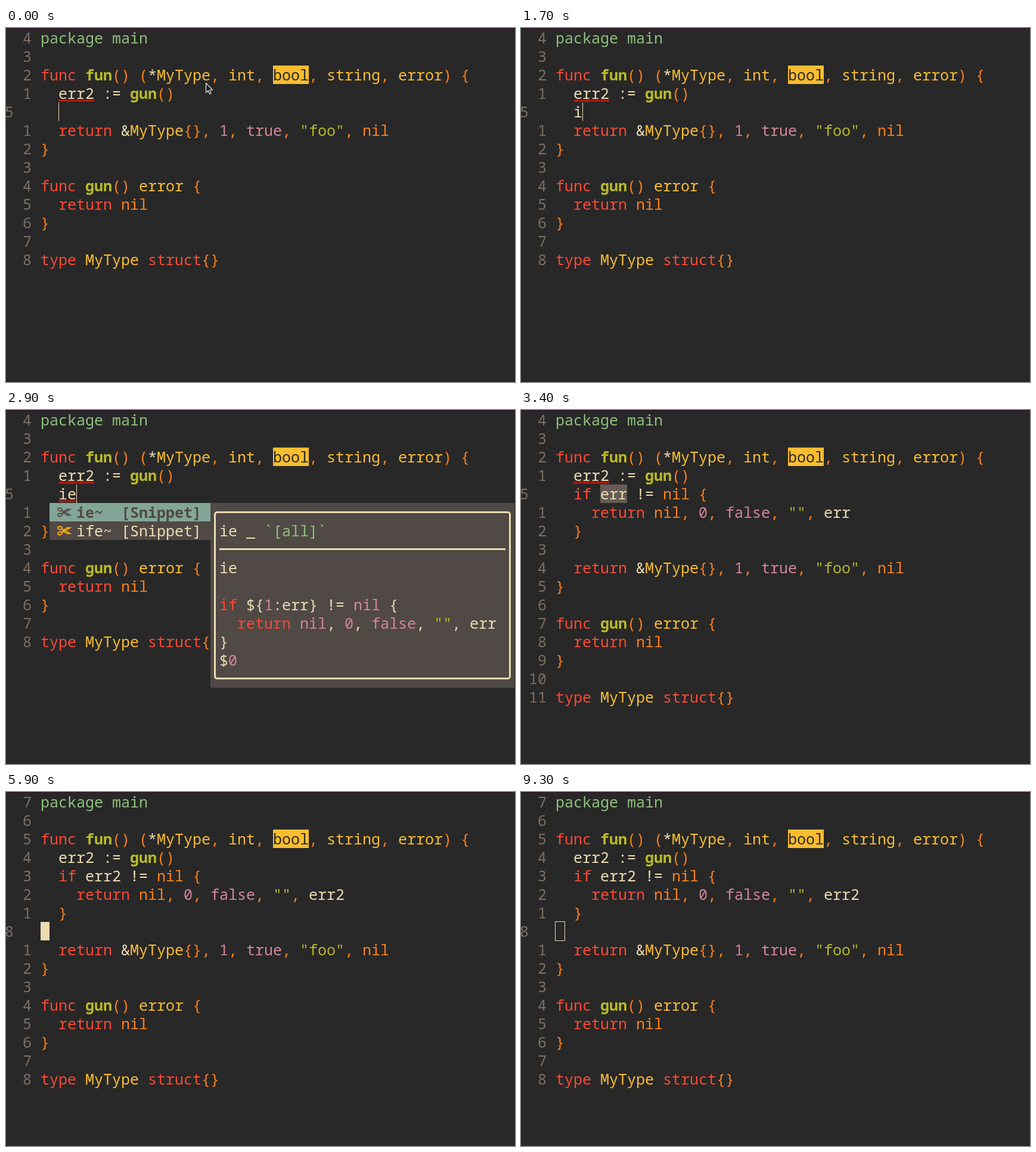
These frames come from a looping animation (854x594 px, 9400 ms). An HTML page:

```html
<!DOCTYPE html>
<html lang="en">
<head>
<meta charset="utf-8">
<title>Go snippet in an editor</title>
<style>
html, body { margin: 0; width: 100%; height: 100%; overflow: hidden; background: #282828; }
svg { display: block; width: 854px; height: 594px; }
text { font: 25px "Noto Sans Mono", "DejaVu Sans Mono", monospace; white-space: pre; }
.bold { font-weight: 700; }
</style>
</head>
<body>
<svg viewBox="0 0 854 594" xmlns="http://www.w3.org/2000/svg">
  <rect width="854" height="594" fill="#282828"/>
  <rect width="854" height="1" fill="#300a24"/>
  <g id="screen"></g>
  <path id="mouse" d="M.5 .5V16.5L4.3 13L6.8 18.8L9.2 17.8L6.8 12H11.5Z"
    fill="#1c1c1c" stroke="#e6e6e6" stroke-width="1.2" stroke-linejoin="round"/>
</svg>
<script>
const LOOP = 9400, STEP = 100;
const CW = 15, LH = 31, LEFT = 58, TOP = 1;
const C = {
  bg: '#282828', fg: '#ebdbb2', red: '#fb4934', yellow: '#fabd2f', green: '#b8bb26',
  orange: '#fe8019', purple: '#d3869b', aqua: '#8ec07c', gutter: '#7c6f64',
  menu: '#504945', pick: '#83a598', error: '#b81a16', visual: '#665c54', icon: '#ffaf00'
};

const screen = document.getElementById('screen');
const mouse = document.getElementById('mouse');
const colX = c => LEFT + c * CW;
const rowY = r => TOP + r * LH;
const escapeText = s => s.replace(/&/g, '&amp;').replace(/</g, '&lt;');

const rect = (x, y, w, h, fill, extra = '') =>
  `<rect x="${x}" y="${y}" width="${w}" height="${h}" fill="${fill}" ${extra}/>`;
const cells = (col, row, n, fill, rows = 1) =>
  rect(colX(col), rowY(row), n * CW, rows * LH, fill);
const label = (col, row, str, fill, bold) =>
  `<text x="${colX(col)}" y="${rowY(row) + 25}" fill="${fill}"${bold ? ' class="bold"' : ''}>${escapeText(str)}</text>`;

// Syntax colouring
const TOKEN = /"[^"]*"|`[^`]*`|\w+|[!:]=|[^\s\w]/g;

function colorOf(tok, doc) {
  if (/^(func|return|if|type|struct)$/.test(tok)) return C.red;
  if (/^(package|main)$/.test(tok) || tok[0] === '`') return C.aqua;
  if (/^(MyType|int|string|error)$/.test(tok)) return C.yellow;
  if (/^(\d+|true|false)$/.test(tok)) return C.purple;
  if (tok === 'nil') return doc ? C.purple : C.orange;
  if (tok === 'bool') return C.bg;
  if (tok[0] === '"') return C.green;
  if (/^[(){},]$/.test(tok)) return doc ? C.fg : C.orange;
  return C.fg;
}

function codeLine(str, row, col = 0, doc = false) {
  let out = '';
  for (const m of str.matchAll(TOKEN)) {
    const tok = m[0], at = col + m.index;
    const name = /^[fg]un$/.test(tok);
    if (tok === 'bool') out += cells(at, row, 4, C.yellow);
    out += label(at, row, tok, name ? C.green : colorOf(tok, doc), name);
  }
  return out;
}

const HEAD = ['package main', '', 'func fun() (*MyType, int, bool, string, error) {', '  err2 := gun()'];
const TAIL = ['  return &MyType{}, 1, true, "foo", nil', '}', '', 'func gun() error {',
  '  return nil', '}', '', 'type MyType struct{}'];
const DOC = ['ie _ `[all]`', '', 'ie', '', 'if ${1:err} != nil {',
  '  return nil, 0, false, "", err', '}', '$0'];

const gutter = (row, current) => row === current
  ? label(-4, row, String(row + 1), C.gutter)
  : label(-1 - String(Math.abs(row - current)).length, row, String(Math.abs(row - current)), C.gutter);

const wavy = (col, row, n) => rect(colX(col), rowY(row) + 26.5, n * CW, 3, C.error, 'rx="1"');

function scissors(row, color) {
  return `<g transform="translate(86 ${rowY(row) + 7})" fill="none" stroke="${color}" stroke-width="1.8">
    <ellipse cx="4.5" cy="4" rx="3.6" ry="2.5" transform="rotate(18 4.5 4)"/>
    <ellipse cx="4.5" cy="13" rx="3.6" ry="2.5" transform="rotate(-18 4.5 13)"/>
    <path d="M7.5 5.2L21.5 13.2L17 13.5L9 8.5M7.5 11.8L21.5 3.8L17 3.5L9 8.5"/></g>`;
}

function menu(picked) {
  let out = cells(1, 5, 18, C.menu, 2);
  if (picked) out += cells(1, 5, 18, C.pick);
  ['ie~  [Snippet]', 'ife~ [Snippet]'].forEach((item, i) => {
    const on = picked && i === 0;
    out += scissors(5 + i, on ? C.menu : C.icon) + label(4, 5 + i, item, on ? C.menu : C.fg, on);
  });
  return out;
}

function docs() {
  return rect(343, 156, 510, 310, C.menu) +
    rect(350.5, 171.5, 495, 279, 'none', `rx="4" stroke="${C.fg}" stroke-width="3"`) +
    rect(358, 232, 480, 3, C.fg) +
    DOC.map((s, i) => codeLine(s, 6 + i, 20, true)).join('');
}

function caret(kind, col, row) {
  const x = colX(col), y = rowY(row);
  if (kind === 'bar') return rect(x, y, 1, LH, C.fg);
  if (kind === 'block') return rect(x, y, CW, LH, C.fg);
  if (kind === 'hollow') return rect(x - .5, y - .5, CW + 1, LH + 1, 'none', `stroke="${C.fg}"`);
  return '';
}

// Number of keys pressed so far
const typed = (t, times) => times.filter(k => t >= k).length;

function editor(t) {
  const expanded = t >= 3400, jumped = t >= 4800;
  let body, row = 4, col, kind = 'bar', marks = [], back = '', front = '';

  if (!expanded) {
    const word = 'ie'.slice(0, typed(t, [1600, 1800]));
    body = ['  ' + word];
    col = 2 + word.length;
    marks.push([2, 3, 4]);
    if (t >= 2000) marks.push([2, 4, 2]);
    if (t >= 1900) front = menu(t >= 2400);
    if (t >= 2500) front += docs();
  } else {
    const n = typed(t, [3700, 3800, 4000, 4200]);
    const word = n ? 'err2'.slice(0, n) : 'err';
    body = [`  if ${word} != nil {`, `    return nil, 0, false, "", ${jumped ? 'err2' : 'err'}`, '  }', ''];
    col = 5 + word.length;
    if (!n) {
      kind = 'none';
      back = cells(5, 4, 3, C.visual);
    }
    if (t < 4300) marks.push([2, 3, 4]);
    if (t >= 3800 && !jumped) marks.push([30, 5, 3]);
    if (jumped) {
      row = 7;
      col = t < 5100 ? 2 : 0;
      kind = t < 5100 ? 'bar' : t < 9300 ? 'block' : 'hollow';
    }
  }

  const lines = [...HEAD, ...body, ...TAIL];
  return back +
    lines.map((s, r) => gutter(r, row) + codeLine(s, r)).join('') +
    marks.map(m => wavy(...m)).join('') +
    caret(kind, col, row) + front;
}

function moveMouse(t) {
  const p = Math.min(t / 800, 1), e = p * p * (3 - 2 * p);
  mouse.setAttribute('transform', `translate(${335 - 194 * e} ${92 + 41 * e})`);
  mouse.setAttribute('visibility', t < 1600 ? 'visible' : 'hidden');
}

let shown = -1;
function render(now) {
  const t = Math.floor((now % LOOP) / STEP) * STEP;
  if (t !== shown) {
    shown = t;
    screen.innerHTML = editor(t);
    moveMouse(t);
  }
}

const start = performance.now();
function tick() {
  render(performance.now() - start);
  requestAnimationFrame(tick);
}
tick();
</script>
</body>
</html>
```
